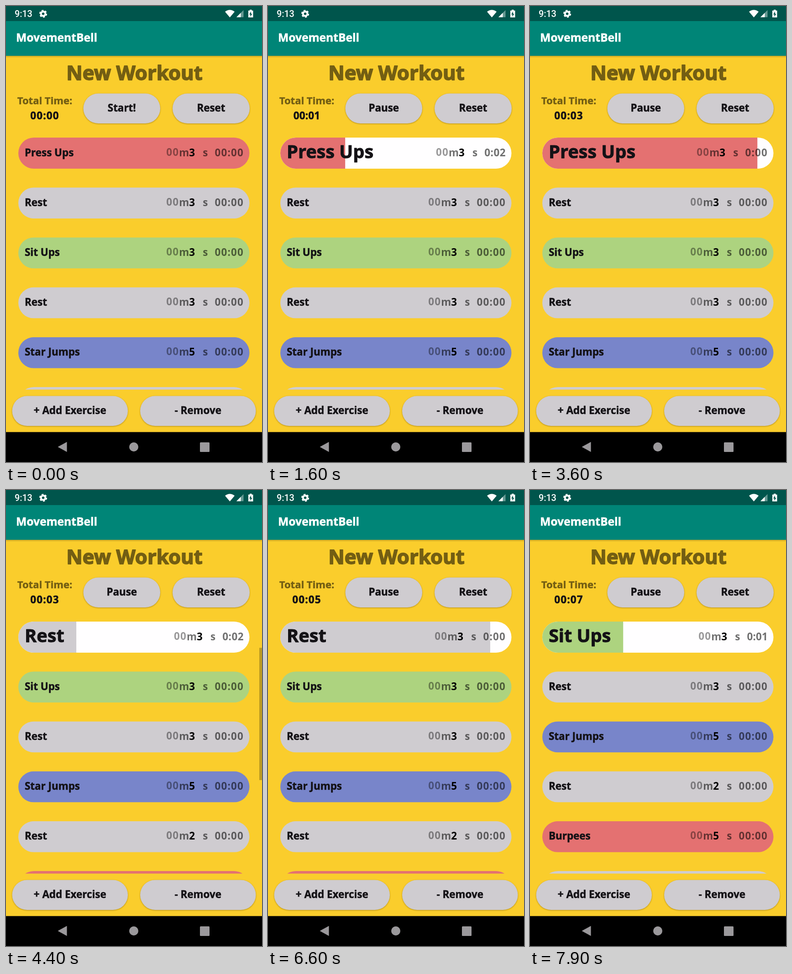
Animation of 561 by 998 pixels, one loop 8 s. Source, as an HTML page:

```html
<!DOCTYPE html>
<html lang="en">
<head>
<meta charset="utf-8">
<title>MovementBell</title>
<style>
html, body { margin: 0; width: 100%; height: 100%; overflow: hidden; background: #facd2c; }
svg { display: block; width: 561px; height: 998px; font: 700 22.4px "Open Sans", "Noto Sans", sans-serif; }
text { white-space: pre; }
.bold { fill: #141216; stroke: #141216; stroke-width: .025em; stroke-linejoin: round; }
.head { fill: #735e13; stroke: #735e13; }
.mid { text-anchor: middle; }
.button rect { fill: #cfccd0; filter: drop-shadow(0 1.5px 1.5px rgba(70, 45, 0, .4)); }
</style>
</head>
<body>
<svg viewBox="0 0 561 998">
  <defs>
    <clipPath id="list"><rect y="287" width="561" height="552.5"/></clipPath>
    <clipPath id="pill"><rect x="27" width="506.5" height="68" rx="34"/></clipPath>
    <linearGradient id="shade" x2="0" y2="1">
      <stop stop-color="#000" stop-opacity=".22"/>
      <stop offset="1" stop-color="#000" stop-opacity="0"/>
    </linearGradient>
  </defs>
  <rect width="561" height="998" fill="#facd2c"/>
  <rect y="108.5" width="561" height="5" fill="url(#shade)"/>
  <rect width="561" height="109" fill="#008577"/>
  <rect width="561" height="33" fill="#00554c"/>

  <g fill="#fff">
    <text x="19" y="24" style="font: 500 19.7px Roboto, sans-serif">9:13</text>
    <circle cx="81.5" cy="17" r="4.8" fill="none" stroke="#fff" stroke-width="4"/>
    <circle cx="81.5" cy="17" r="7.3" fill="none" stroke="#fff" stroke-width="2.6" stroke-dasharray="4.3 3.345"/>
    <path d="M480 12.5Q490.500 4.500 501 12.500L490.500 25Z"/>
    <path d="M505 24.500L520.500 9V24.500Z" opacity=".4"/>
    <path d="M505 24.500L514.500 15V24.500Z"/>
    <path d="M531 10h3V8h4.500v2h3v15H531Z"/>
    <path d="M537 12l-4 6.500h2.500v5l4-6.500H537Z" fill="#00554c"/>
  </g>
  <text x="22" y="78" fill="#fff" stroke="#fff" stroke-width=".6" font-size="24.600">MovementBell</text>
  <text class="bold head mid" x="281.500" y="161.500" font-size="43.700" style="stroke-width:1.800px">New Workout</text>
  <text class="bold head mid" x="85" y="214.500" font-size="22">Total Time:</text>
  <text class="bold mid" id="total" x="85" y="247.500"></text>

  <g id="buttons"></g>
  <g clip-path="url(#list)">
    <g id="rows"></g>
    <rect id="thumb" x="555" width="6" height="289.500"/>
  </g>

  <rect y="932.500" width="561" height="66"/>
  <g fill="#9b999c">
    <path d="M113.500 965L133.500 954V976Z"/>
    <circle cx="280" cy="965" r="10"/>
    <rect x="425" y="955" width="21" height="21" rx="1.500"/>
  </g>
</svg>
<script>
const LOOP = 8000, PITCH = 109.2, SCROLL = 400;
const RED = '#e47171', GREY = '#cfccd0', GREEN = '#add37f', BLUE = '#7885ca';
const exercises = [
  ['Press Ups', 3, RED], ['Rest', 3, GREY], ['Sit Ups', 3, GREEN], ['Rest', 3, GREY],
  ['Star Jumps', 5, BLUE], ['Rest', 2, GREY], ['Burpees', 5, RED], ['Rest', 2, GREY]
];
// Each run: when it shows, when its bar starts, time for a full bar
const runs = [
  { at: 700, from: 737, full: 3075 },
  { at: 3680, from: 3561, full: 3344 },
  { at: 6720, from: 6663, full: 3535 }
];
const $ = id => document.getElementById(id);
const clamp = v => Math.max(0, Math.min(1, v));
const easeOut = v => 1 - (1 - clamp(v)) ** 5;
// Narrow digits sit closer together
const spacing = s => ({ 1: .2, 2: .5 })[s.at(-1)] ?? 1.2;

function button(x, y, w, label, id = '') {
  return `<g class="button"><rect x="${x}" y="${y}" width="${w}" height="65.5" rx="32.75"/>
    <text id="${id}" class="bold mid" x="${x + w / 2}" y="${y + 39.5}">${label}</text></g>`;
}

function row([name, secs, color], y, done, active) {
  const clock = active ? `0:0${Math.floor(secs * (1 - done))}` : '00:00';
  return `<g transform="translate(0 ${y})">
    <g clip-path="url(#pill)">
      <rect x="27" width="507" height="68" fill="${active ? '#fffeff' : color}"/>
      <rect x="27" width="${506 * done}" height="68" fill="${color}"/>
    </g>
    <text class="bold" x="41" y="${active ? 45 : 40.5}" font-size="${active ? 39.7 : 22.4}">${name}</text>
    <text x="521" y="40.5" text-anchor="end" letter-spacing="1.2"><tspan
      dy="-1" fill-opacity=".4">00</tspan><tspan
      dy="1" fill-opacity=".56" letter-spacing="0">m</tspan><tspan>${secs}</tspan><tspan
      dx="16" fill-opacity=".56">s</tspan><tspan
      dx="14" fill-opacity=".56" letter-spacing="${spacing(clock)}">${clock}</tspan></text>
  </g>`;
}

function draw(t) {
  const current = runs.findLastIndex(r => t >= r.at);
  const run = runs[current];
  const done = run ? clamp((t - run.from) / run.full) : 0;
  const moved = t - (run ? run.at : 0);
  const scroll = current > 0 ? current - 1 + easeOut(moved / SCROLL) : 0;

  const total = `00:0${Math.max(0, Math.floor((t - 590) / 1003))}`;
  $('total').textContent = total;
  $('total').setAttribute('letter-spacing', spacing(total));
  $('action').textContent = run ? 'Pause' : 'Start!';
  $('rows').innerHTML = exercises.map((e, i) =>
    row(e, 288 + (i - scroll) * PITCH, i === current ? done : 0, i === current)).join('');
  $('thumb').setAttribute('y', 288 + scroll * 57.4);
  $('thumb').setAttribute('opacity', current > 0 ? .27 * clamp((SCROLL + 550 - moved) / 250) : 0);
}

$('buttons').innerHTML = button(169.5, 191.5, 168.5, 'Start!', 'action') +
  button(365, 191.5, 169, 'Reset') +
  button(13.5, 853.5, 253.5, '+ Add Exercise') +
  button(294, 853.5, 253.5, '- Remove');

const start = performance.now();
function tick() {
  draw((performance.now() - start) % LOOP);
  requestAnimationFrame(tick);
}
tick();
</script>
</body>
</html>
```
